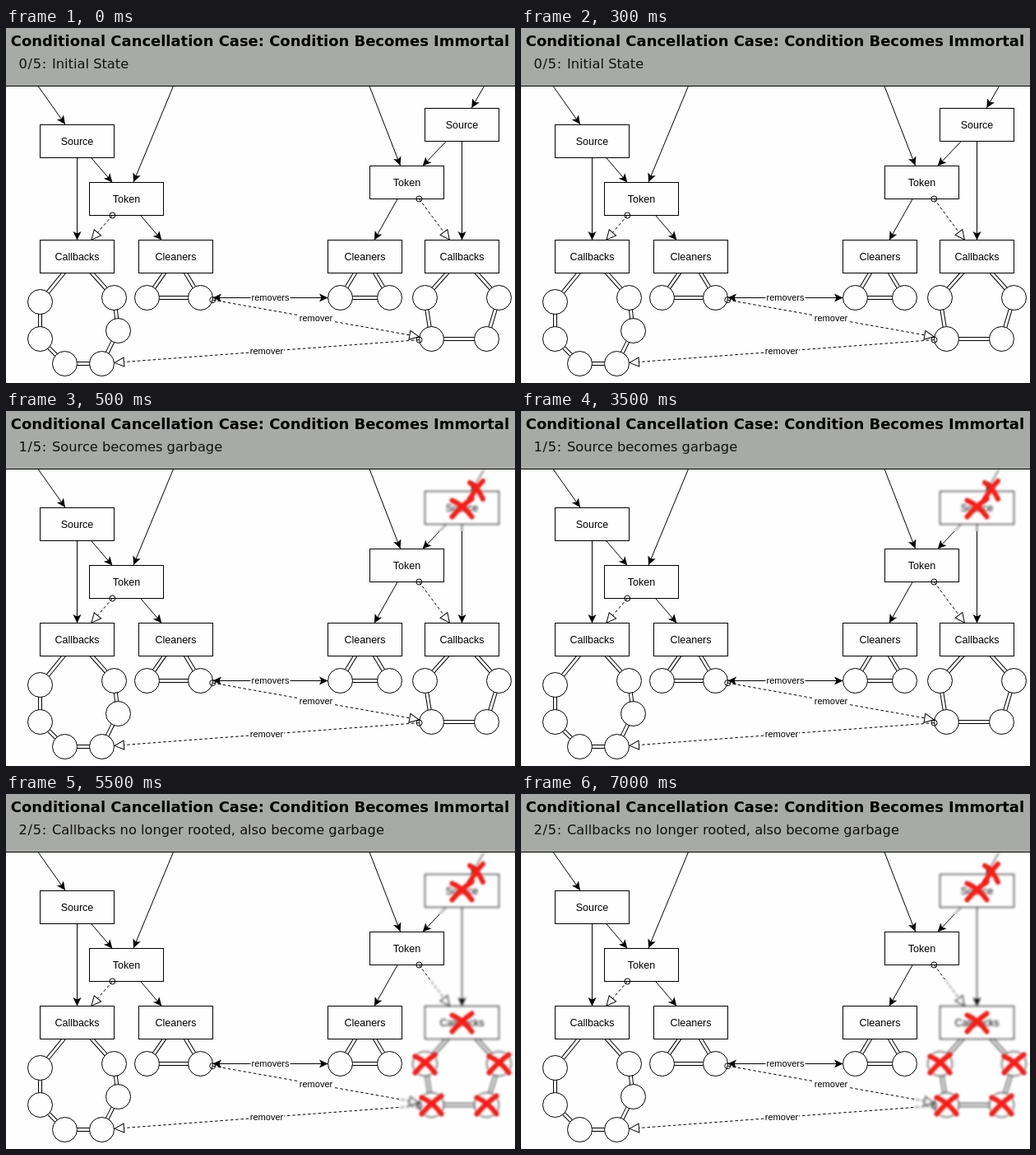
An HTML page that plays this animation: 619 px wide and 431 px high, repeating every 8000 ms.

```html
<!DOCTYPE html>
<html lang="en">
<head>
<meta charset="utf-8">
<title>Conditional Cancellation</title>
<style>
  html, body { margin: 0; width: 100%; height: 100%; overflow: hidden; background: #fefefe; }
  svg { display: block; width: 619px; height: 431px; }
  .node { fill: #fefefe; stroke: #000; }
  .edge { fill: none; stroke: #000; }
  .gap { fill: none; stroke: #fefefe; stroke-width: 3; }
  .label { font: 12.5px "Liberation Sans", Arial, sans-serif; text-anchor: middle; }
  .small { font-size: 11px; }
  .title { font: bold 17.95px "DejaVu Sans", Verdana, sans-serif; }
  .caption { font: 16.25px "DejaVu Sans", Verdana, sans-serif; fill: #111; }
  .cross { fill: none; stroke: #fa1c18; stroke-width: 6; stroke-linecap: round; }
</style>
</head>
<body>
<svg viewBox="0 0 619 431">
  <defs>
    <marker id="solid" markerUnits="userSpaceOnUse" markerWidth="12" markerHeight="12" viewBox="-11 -6 12 12" orient="auto-start-reverse">
      <path d="M0 0L-10.5-5L-8 0L-10.5 5Z"/>
    </marker>
    <marker id="hollow" markerUnits="userSpaceOnUse" markerWidth="15" markerHeight="14" viewBox="-14 -7 15 14" orient="auto">
      <path class="node" d="M-.5 0L-12-5.5V5.5Z"/>
    </marker>
    <marker id="ring" markerUnits="userSpaceOnUse" markerWidth="10" markerHeight="10" viewBox="-5 -5 10 10">
      <circle class="edge" r="3.5"/>
    </marker>
    <filter id="fade" filterUnits="userSpaceOnUse" x="0" y="0" width="619" height="431" color-interpolation-filters="sRGB">
      <feGaussianBlur stdDeviation="1.6"/>
    </filter>
    <filter id="soft" x="-20%" y="-20%" width="140%" height="140%"><feGaussianBlur stdDeviation="1"/></filter>
    <clipPath id="area"><path id="areaPath"/></clipPath>
  </defs>
  <g id="scene"></g>
  <g clip-path="url(#area)"><use href="#scene" filter="url(#fade)"/></g>
  <g id="crosses"></g>
  <rect width="619" height="70" fill="#a8aaa7"/>
  <rect y="70" width="619" height="1"/>
  <text class="title" x="5.8" y="22">Conditional Cancellation Case: Condition Becomes Immortal</text>
  <text class="caption" id="step" x="15.5" y="49" letter-spacing=".7"></text>
  <text class="caption" id="caption" x="56" y="49"></text>
</svg>
<script>
const $ = id => document.getElementById(id);
const R = 15, BOX_W = 90, BOX_H = 40;

const point = (x, y) => ({ x: x + .5, y: y + .5 });
const offset = (p, dx, dy) => ({ x: p.x + dx, y: p.y + dy });
const mix = (a, b, k) => offset(a, (b.x - a.x) * k, (b.y - a.y) * k);

// One half of the diagram: a root above each of source and token,
// and a chain of circles hanging from callbacks and cleaners.
function side(source, token, callbacks, cleaners, sourceRoot, tokenRoot, callbackChain, cleanerChain) {
  const hang = (top, steps) => steps.map(([dx, dy]) => offset(top, dx, dy));
  return { source, token, callbacks, cleaners, sourceRoot, tokenRoot,
    items: hang(callbacks, callbackChain), ends: hang(cleaners, cleanerChain) };
}

const left = side(point(86, 137), point(146, 207), point(86, 277), point(206, 277),
  point(38.5, 70), point(203, 70),
  [[-45, 55], [-45, 100], [-15, 130], [30, 130], [50, 90], [45, 50]], [[-35, 50], [30, 50]]);
const right = side(point(554, 117), point(487, 187), point(554, 277), point(436, 277),
  point(581, 70), point(441.5, 70),
  [[-45, 50], [-37, 100], [30, 100], [45, 50]], [[-30, 50], [30, 50]]);

const SOLID = 'marker-end="url(#solid)"';
const BOTH = SOLID + ' marker-start="url(#solid)"';
const WEAK = 'stroke-dasharray="3.5 2.8" marker-start="url(#ring)" marker-end="url(#hollow)"';

const line = (a, b, style) => `<path class="edge" d="M${a.x} ${a.y}L${b.x} ${b.y}" ${style}/>`;

// Edges run between centres and stop at the outline.
function boxEdge(a, b, style) {
  const k = BOX_H / 2 / (b.y - a.y);
  return line(mix(a, b, k), mix(b, a, k), style);
}
function rootEdge(root, b) {
  return line(root, mix(b, root, (BOX_H / 2 + .5) / (b.y - root.y)), SOLID);
}
function circleEdge(a, b, style, text) {
  const k = R / Math.hypot(b.x - a.x, b.y - a.y);
  const mid = mix(a, b, .5);
  const w = text.length * 6;
  return line(mix(a, b, k), mix(b, a, k), style) +
    `<rect x="${mid.x - w / 2}" y="${mid.y - 9}" width="${w}" height="16" fill="#fefefe"/>` +
    `<text class="label small" x="${mid.x}" y="${mid.y + 3}">${text}</text>`;
}

function chain(top, circles) {
  const d = 'M' + [top, ...circles].map(p => `${p.x} ${p.y}`).join('L') + 'Z';
  return `<path class="edge" stroke-width="5" d="${d}"/><path class="gap" d="${d}"/>` +
    circles.map(p => `<circle class="node" cx="${p.x}" cy="${p.y}" r="${R}"/>`).join('');
}

const box = (name, p) =>
  `<rect class="node" x="${p.x - BOX_W / 2}" y="${p.y - BOX_H / 2}" width="${BOX_W}" height="${BOX_H}"/>` +
  `<text class="label" x="${p.x}" y="${p.y + 4.5}">${name}</text>`;

const half = s =>
  chain(s.callbacks, s.items) + chain(s.cleaners, s.ends) +
  box('Source', s.source) + box('Token', s.token) +
  box('Callbacks', s.callbacks) + box('Cleaners', s.cleaners) +
  rootEdge(s.sourceRoot, s.source) + rootEdge(s.tokenRoot, s.token) +
  boxEdge(s.source, s.token, SOLID) + boxEdge(s.source, s.callbacks, SOLID) +
  boxEdge(s.token, s.cleaners, SOLID) + boxEdge(s.token, s.callbacks, WEAK);

$('scene').innerHTML =
  '<rect width="619" height="431" fill="#fefefe"/>' + half(left) + half(right) +
  circleEdge(left.ends[1], right.ends[0], BOTH, 'removers') +
  circleEdge(left.ends[1], right.items[1], WEAK, 'remover') +
  circleEdge(right.items[1], left.items[3], WEAK, 'remover');

// Two bent strokes over everything that became garbage.
function cross({ x, y }, w = 12) {
  return `<path class="cross" filter="url(#soft)" d="M${x - w} ${y - 9}Q${x + 2} ${y - 3} ${x + w} ${y + 11}` +
    `M${x + w} ${y - 11}Q${x - 1} ${y - 2} ${x - w} ${y + 11}"/>`;
}
const rootCross = offset(mix(right.source, right.sourceRoot, .5), 4, 2);
const dead = [right.source, rootCross, right.callbacks, ...right.items];
$('crosses').innerHTML = dead.map(p => cross(p, p === rootCross ? 8 : 12)).join('');

const sourceArea = 'M504 71H606V146H504Z';
const steps = [
  { end: 500, text: 'Initial State', dead: 0, area: '' },
  { end: 5500, text: 'Source becomes garbage', dead: 2, area: sourceArea },
  { end: 8000, text: 'Callbacks no longer rooted, also become garbage', dead: dead.length,
    area: sourceArea + 'M536 146H606L619 250V402H478V364L504 225H541Z' }
];

let shown = -1;
function draw(t) {
  const i = steps.findIndex(s => t < s.end);
  if (i === shown) return;
  shown = i;
  const s = steps[i];
  $('step').textContent = `${i}/5:`;
  $('caption').textContent = s.text;
  $('areaPath').setAttribute('d', s.area);
  [...$('crosses').children].forEach((c, n) => c.style.display = n < s.dead ? '' : 'none');
}

const start = performance.now();
function tick() {
  draw((performance.now() - start) % 8000);
  requestAnimationFrame(tick);
}
tick();
</script>
</body>
</html>
```
